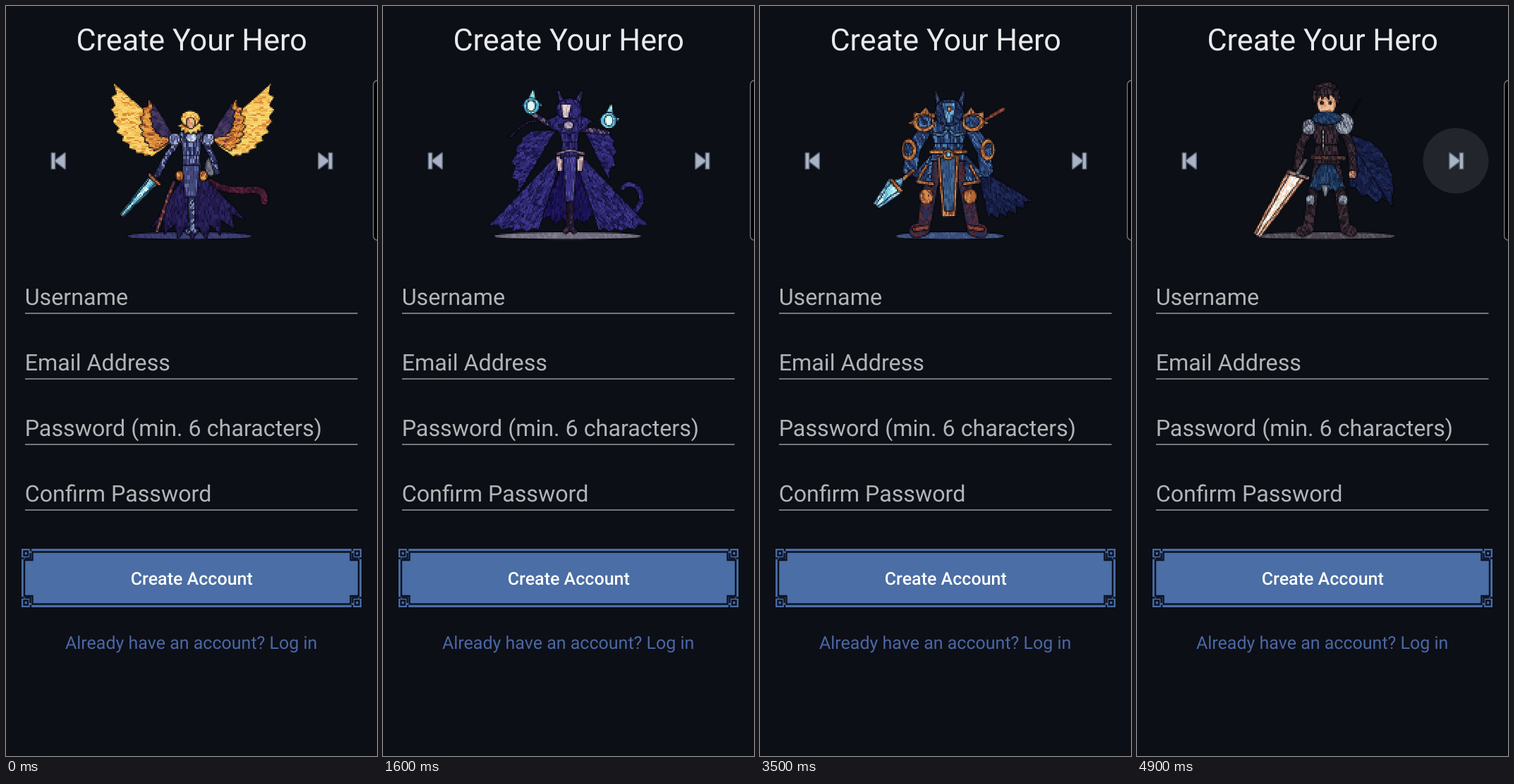
Recreate the animation shown at these times as an HTML page with a canvas. Size 526 by 1064 pixels, loop 5 s.

```html
<!DOCTYPE html>
<html lang="en">
<head>
<meta charset="utf-8">
<title>Create Your Hero</title>
<style>
html, body { margin: 0; width: 100%; height: 100%; overflow: hidden; background: #0c0f16; }
svg, canvas { position: absolute; left: 0; top: 0; }
canvas { left: 140px; top: 96px; width: 246px; height: 246px; image-rendering: pixelated; }
text { font-family: Roboto, sans-serif; text-rendering: geometricPrecision; }
.mid { text-anchor: middle; }
.field { font-size: 32.25px; fill: #b3b4b6; }
.rule { stroke: #97989b; stroke-width: 1.7; }
.icon { fill: #a8b3c6; stroke: #5c6472; stroke-width: 3; stroke-linejoin: round; paint-order: stroke; }
.ink { fill: none; stroke: #0c1222; stroke-width: 2.4; }
</style>
</head>
<body>
<svg width="526" height="1064" viewBox="0 0 526 1064">
  <defs>
    <path id="skip" class="icon" d="M65 209h4v21.500h-4zM83.500 209v21.500L69.500 219.700z"/>
    <g id="corner">
      <path d="M22 770h14v14h-14z" fill="#4a6ca5"/>
      <path class="ink" d="M25.500 773.500h5.500v6h-5.500zM35 770v3.500M22 783.500h3.500M34.500 776v7.500h-8"/>
    </g>
  </defs>
  <rect x="520.700" y="105.700" width="40" height="226.600" rx="6" fill="#000" stroke="#75777a" stroke-width="1.400"/>
  <text class="mid" x="263.200" y="63" font-size="43.200" fill="#e9eaec">Create Your Hero</text>
  <circle id="ripple" cx="452" cy="219.500" r="46.500" fill="#fff" opacity="0"/>
  <use href="#skip"/>
  <use href="#skip" transform="matrix(-1 0 0 1 527 0)"/>
  <g id="fields"></g>
  <rect x="22" y="770" width="482" height="83" fill="#4a6ea5"/>
  <path class="ink" d="M37.500 774.500H488.500V786H500V837H488.500V848.500H37.500V837H26V786H37.500z"/>
  <use href="#corner"/>
  <use href="#corner" transform="matrix(-1 0 0 1 526 0)"/>
  <use href="#corner" transform="matrix(1 0 0 -1 0 1623)"/>
  <use href="#corner" transform="matrix(-1 0 0 -1 526 1623)"/>
  <text class="mid" x="263.300" y="821" font-size="25" font-weight="500" fill="#fff">Create Account</text>
  <text class="mid" x="262.700" y="912" font-size="25" fill="#4c67a5">Already have an account? Log in</text>
</svg>
<canvas id="hero" width="128" height="128"></canvas>
<script>
const LOOP = 5000, STEP = 100, SCALE = 128 / 246;
const ctx = hero.getContext('2d');
ctx.imageSmoothingEnabled = false;
ctx.lineJoin = ctx.lineCap = 'round';

fields.innerHTML = ['Username', 'Email Address', 'Password (min. 6 characters)', 'Confirm Password']
  .map((s, i) => `<text class="field" x="26.700" y="${424 + 93 * i}">${s}</text>
    <path class="rule" d="M27 ${436 + 93 * i}H498.500"/>`).join('');

const GOLD = 'f6cb60 f8d97c edb04c d98b38', EMBER = 'd98a3c b8632f e9a648 7d4034';
const STEEL = '343a68 535f92 23264c 8791bd', NIGHT = '211a4a 2b2460 17113a';
const VIOLET = '2d2871 221d58 3b3687 191443', SKIN = 'efbb94 d49570';
const LEATHER = '451824 61242d 2c111d', RED = '9d1b38 bd2946 701331';
const BRONZE = 'b06837 d48b4e 74402f', PLATE = '263b69 37598c 192646 507fae';
const IRON = '707786 a2a9b7 464b5b', DARK = '2b2028 43313a 1b151f';
const DENIM = '1c3558 2b4b75 142643', ICE = '8edfe9 4ba3c5 d9fbff 6cc4d8';
const CAPE = '161d45 1e2a58 0f142f', SCARF = '3f1930 5c2239 2a1226';

const clamp = v => Math.max(0, Math.min(1, v));
const mix = (a, b, u) => a + (b - a) * u;
const home = new DOMMatrix([SCALE, 0, 0, SCALE, -140 * SCALE, -96 * SCALE]);
let base = home;
const grains = {};

// Seeded tile of shades; the first shades are the most common.
function grain(shades) {
  if (grains[shades]) return grains[shades];
  const list = shades.split(' '), tile = document.createElement('canvas');
  tile.width = tile.height = 64;
  const g = tile.getContext('2d');
  let seed = 7;
  for (let i = 0; i < 4096; i++) {
    seed = (seed * 48271) % 2147483647;
    g.fillStyle = '#' + list[Math.floor((seed / 2147483647) ** 1.4 * list.length)];
    g.fillRect(i % 64, i >> 6, 1, 1);
  }
  return grains[shades] = ctx.createPattern(tile, 'repeat');
}

// Fills a path, or strokes it when a width is given, over a dark outline.
function paint(d, shades, angle = 60, width = 0) {
  const path = new Path2D(), fill = grain(shades);
  path.addPath(new Path2D(d), base);
  fill.setTransform(new DOMMatrix().rotate(base.a < 0 ? -angle : angle).scale(3, 1));
  ctx.strokeStyle = '#07070d';
  ctx.lineWidth = width * SCALE + 1.4;
  ctx.stroke(path);
  ctx.strokeStyle = ctx.fillStyle = fill;
  ctx.lineWidth = width * SCALE;
  if (width) ctx.stroke(path); else ctx.fill(path);
}
const line = (points, width, shades) => paint('M' + points, shades, 60, width);
const blob = (x, y, rx, ry, shades) => paint(`M${x - rx} ${y}a${rx} ${ry} 0 1 0 ${2 * rx} 0a${rx} ${ry} 0 1 0 ${-2 * rx} 0`, shades);

// Straight part that tapers from width w1 to w2.
function limb(x1, y1, x2, y2, w1, w2, shades) {
  const a = Math.atan2(y2 - y1, x2 - x1), c = Math.cos(a) / 2, s = Math.sin(a) / 2;
  paint(`M${x1 - s * w1} ${y1 + c * w1}L${x1 + s * w1} ${y1 - c * w1} ${x2 + s * w2} ${y2 - c * w2} ${x2 - s * w2} ${y2 + c * w2}z`,
    shades, a * 180 / Math.PI);
}

// Ragged sector with n tips: feathers, cloth and hair.
function fan(x, y, [from, to], [near, far], n, shades, notch = .9) {
  let d = `M${x} ${y}L`;
  for (let i = 0; i <= 2 * n; i++) {
    const u = i / (2 * n), a = mix(from, to, u) * Math.PI / 180;
    const r = mix(near, far, u) * (i % 2 ? notch : 1);
    d += `${x + r * Math.cos(a)} ${y + r * Math.sin(a)} `;
  }
  paint(d + 'z', shades, mix(from, to, .6));
}

function within(matrix, draw) {
  const saved = base;
  base = base.multiply(matrix);
  draw();
  base = saved;
}
const move = (y, draw) => within(new DOMMatrix().translate(0, y), draw);
const turn = (x, y, deg, draw) => within(new DOMMatrix().translate(x, y).rotate(deg).translate(-x, -y), draw);
const widen = (x, s, draw) => within(new DOMMatrix([s, 0, 0, 1, x * (1 - s), 0]), draw);
const pair = (x, draw) => { draw(); widen(x, -1, draw); };

const ground = (x, half, shades) => blob(x, 326, half, 5, shades);

function legs({ x, hip, stance, thick }, shades) {
  const knee = mix(hip, 320, .45);
  pair(x, () => {
    line(`${x - thick * .7} ${hip} ${x - stance * .62} ${knee} ${x - stance * .85} 316 ${x - stance - 4} 319`, thick, shades);
  });
}

function torso({ x, neck, hip, span }, shades) {
  const waist = mix(neck, hip, .65);
  limb(x, neck, x, waist, span * 2, span * 1.25, shades);
  limb(x, waist, x, hip + 6, span * 1.25, span * 1.6, shades);
}

// Elbows bend outward from the line between shoulder and hand.
function arms({ x, neck, span, thick }, hands, shades) {
  hands.forEach(([hx, hy], i) => {
    const side = i ? 1 : -1, sx = x + side * span;
    line(`${sx} ${neck + 10} ${mix(sx, hx, .5) + side * thick * .4} ${mix(neck + 10, hy, .5)} ${hx} ${hy}`, thick, shades);
  });
}

function blade(x1, y1, x2, y2, width, shades, edge) {
  limb(x1, y1, x2, y2, width, width * .4, edge);
  limb(x1, y1, x2, y2, width * .6, 2, shades);
}

function angel(wave) {
  const body = { x: 263, neck: 179, hip: 232, span: 17, stance: 1, thick: 7 };
  ground(260, 88, '3e4076 343567');
  turn(264, 185, -1.9 * wave, () => pair(264.5, () => {
    fan(240, 188, [142, 222], [42, 117], 9, GOLD, .92);
    fan(240, 188, [150, 236], [34, 68], 7, EMBER);
    fan(240, 188, [190, 238], [22, 60], 5, '3c2f5a 4d3b5e 272348');
  }));
  turn(290, 250, 3 * wave, () => line('288 250Q315 264 342 261T366 277', 9, SCARF));
  turn(263, 225, wave, () => {
    fan(263, 224, [46, 122], [109, 106], 7, NIGHT, .83);
    line('238 250 225 285 214 319', 4, '5a2b3d a9573b 323056');
  });
  blob(290, 228, 7, 13, '777985 5b5d70');
  legs(body, STEEL);
  torso(body, STEEL);
  limb(262, 226, 262, 270, 22, 15, '454a7d 363a68 6169a0');
  arms(body, [[214, 240], [299, 236]], STEEL);
  blob(263, 187, 7, 6, 'd7def2 97a5d0');
  pair(263, () => {
    blob(239, 189, 7, 8, '6c76a3 474d7c a9b2d6');
    blob(246, 241, 5, 6, EMBER);
  });
  blade(208, 248, 164, 297, 15, ICE, '4ba3c5 3f6d9c');
  line('203 239 217 252', 4, 'b06439 533050');
  fan(262, 160, [30, 150], [22, 22], 6, GOLD, .8);
  blob(261, 160, 13, 11, GOLD);
  blob(262, 166, 5, 7, SKIN);
}

function flame(x, y) {
  fan(x, y + 8, [195, 345], [14, 16], 3, ICE, .8);
  limb(x, y + 4, x + 3, y - 17, 16, 1, ICE);
  blob(x, y + 5, 11, 11, '59c2e6 94e5f6 3b8fbd');
  blob(x, y + 5, 5, 7, 'd0faff f3f5e4');
}

function sorceress(wave) {
  const body = { x: 265, neck: 165, hip: 210, span: 16, stance: 2, thick: 6 };
  ground(262, 104, '706d80 817e8d');
  turn(335, 297, 3 * wave, () => line('332 297C368 302 374 260 353 253Q343 249 338 258', 6, VIOLET));
  fan(265, 200, [68, 112], [112, 112], 4, '191252 120c3c 211860');
  pair(263, () => fan(258, 200, [108, 134], [124, 155], 4, VIOLET, .96));
  line('245 166Q200 154 182 186', 2, '151231 29234c');
  turn(242, 180, wave, () => fan(244, 177, [120, 178], [104, 34], 5, VIOLET));
  turn(284, 176, -wave, () => fan(284, 174, [64, 8], [80, 36], 4, VIOLET));
  legs(body, '2d2034 49304a 1d1731');
  pair(265, () => limb(250, 214, 251, 234, 9, 6, 'd8bfc4 b0909f'));
  arms(body, [[214, 153], [318, 179]], '302353 77647d 231d4c');
  torso(body, VIOLET);
  limb(265, 214, 265, 276, 17, 10, '393384 2c276d 58519a');
  line('248 210 266 204 284 210', 3, '9c829b 6c587f');
  pair(265, () => limb(255, 138, 248, 121, 8, 3, '272250 473d73'));
  fan(264, 145, [30, 150], [38, 38], 6, VIOLET);
  blob(264, 146, 18, 15, VIOLET);
  limb(260, 140, 259, 158, 13, 6, 'e5d2d3 c5a9b7');
  blob(263, 169, 6, 5, 'cfb9c5 9e88a7');
  move(2 * wave, () => flame(210, 135));
  move(-2 * wave, () => flame(320, 159));
}

function redKnight(wave) {
  const body = { x: 247, neck: 160, hip: 213, span: 18, stance: 48, thick: 14 };
  ground(246, 74, '616a91 727aa2');
  turn(247, 130, wave, () => {
    fan(246, 126, [104, 138], [50, 80], 4, RED);
    fan(248, 124, [64, 28], [55, 80], 5, RED);
  });
  turn(250, 205, wave, () => {
    fan(249, 200, [108, 138], [66, 106], 4, RED + ' 4d1126');
    fan(251, 200, [72, 50], [68, 104], 4, '7c1830 4e1328 972338 351124');
  });
  legs(body, LEATHER);
  pair(246, () => blob(228, 236, 6, 8, 'e0a67f bd7b5e'));
  torso(body, LEATHER);
  limb(245, 215, 243, 280, 19, 15, 'a31c33 841730 bd2c40');
  arms({ ...body, thick: 9 }, [[188, 205], [294, 229]], LEATHER + ' 834239');
  blob(245, 165, 14, 8, 'e7b088 c9855f');
  pair(243, () => blob(234, 174, 7, 6, '858fbd bac2df 5b6394'));
  blob(269, 161, 10, 10, '6a3837 a87746 3d202d');
  line('266 167 281 167', 2, 'cf9b61 804d3c');
  line('235 208 273 213', 3, 'a46e4c 5a2b30');
  blob(246, 131, 14, 17, RED);
  limb(247, 128, 247, 150, 15, 8, SKIN);
  line('241 138 253 138', 1.5, '4d252e d49570');
  blade(299, 231, 353, 274, 11, 'e7eaef ffffff', 'a4a9b8 d0d4dd');
  line('294 238 303 223', 3, '8c574b 4c2732');
}

function warlord(wave, open) {
  const body = { x: 267, neck: 163, hip: 213, span: 31, stance: 42, thick: 18 };
  ground(269, 77, '3c4e7d 47618e');
  if (open) widen(266, mix(.35, 1, open), () => pair(263, () => fan(222, 187, [95, 181], [48, 120], 3, CAPE, .8)));
  if (open < 1) widen(312, 1 - open, () => turn(312, 235, wave, () => fan(308, 230, [31, 78], [92, 72], 5, CAPE)));
  line('320 161 345 146', 4, '71362f 9e4d38');
  legs(body, '2b2f52 5a2c32 391d2d');
  pair(267, () => {
    blob(236, 270, 9, 10, BRONZE);
    line('219 317 238 314', 5, '8b4537 542930');
    fan(244, 211, [92, 134], [46, 42], 3, PLATE);
    line('236 226 223 249 245 252', 3, BRONZE);
  });
  arms(body, [[213, 233], [321, 233]], PLATE);
  torso(body, PLATE);
  pair(267, () => {
    line('246 181 258 184 264 177', 3, '5d91ba 3c6698');
    fan(233, 169, [185, 320], [23, 26], 3, BRONZE, .72);
    blob(232, 166, 15, 12, BRONZE);
    blob(233, 164, 10, 8, PLATE);
    blob(211, 204, 10, 15, BRONZE);
    blob(210, 204, 5, 9, PLATE);
  });
  limb(267, 214, 268, 298, 29, 18, BRONZE);
  limb(267, 216, 268, 290, 21, 11, '345582 27416d 456d99');
  line('243 207 291 207', 5, BRONZE);
  blob(267, 211, 7, 7, BRONZE);
  blob(267, 211, 3, 3, '8edff2 4fa7ce');
  pair(269, () => limb(255, 143, 249, 121, 9, 2, '22304f 3e5174'));
  blob(268, 151, 20, 19, '1d2a50 2b406f 131c38');
  limb(268, 138, 268, 166, 19, 6, '477aa9 75b2d4 2e5486');
  blob(268, 146, 2, 3, 'e6944f');
  within(new DOMMatrix().translate(-6 * open, 0), () => {
    if (open > .5) fan(222, 246, [100, 175], [40, 46], 4, CAPE);
    line('192 255 217 234', 4, BRONZE);
    fan(202, 244, [100, 165], [20, 24], 3, '6aa5ce a9deee 3d71a6');
    blade(194, 253, 165, 283, 26, ICE, '6aa5ce a9deee 3d71a6');
    line('187 247 199 262', 4, BRONZE);
  });
}

function swordsman(wave) {
  const body = { x: 269, neck: 160, hip: 218, span: 23, stance: 31, thick: 14 };
  ground(267, 99, '4b4652 625c66');
  turn(302, 185, wave, () => {
    fan(298, 182, [86, 56], [76, 120], 3, CAPE);
    fan(298, 182, [58, 18], [120, 36], 5, CAPE, .97);
  });
  line('316 134 302 157', 1.5, '08080c 19161d');
  legs(body, DARK);
  pair(269, () => blob(246, 275, 6, 7, IRON));
  fan(269, 208, [62, 118], [57, 57], 4, DENIM);
  limb(267, 254, 267, 270, 11, 2, IRON);
  arms({ ...body, thick: 11 }, [[227, 227], [307, 236]], DARK);
  blob(306, 239, 5, 5, 'cf9675 8f5b4c');
  torso(body, DARK);
  line('264 176 264 203', 2, '95909a 544149');
  line('248 215 293 216', 5, '5a4038 30222a');
  blob(294, 167, 13, 15, IRON);
  blob(244, 172, 9, 11, IRON);
  fan(268, 128, [150, 390], [21, 21], 9, DARK, .85);
  blob(269, 139, 13, 15, SKIN);
  pair(268, () => blob(262, 138, 1.5, 1.5, '2b1c25'));
  fan(267, 115, [15, 165], [17, 17], 5, DARK, .6);
  blob(269, 159, 21, 9, DENIM);
  blade(226, 239, 170, 325, 26, 'f3e2d1 ffffff f0c8a8', 'a66b53 d89c78 e9c2a2');
  line('214 236 242 244', 4, 'a08078 5a4a50');
  line('228 238 239 219', 4, '5e5962 8c8a92');
}

// Each hero enters at its time, by a tap on the next button.
const cast = [
  { from: 0, draw: angel },
  { from: 1300, draw: sorceress },
  { from: 2200, draw: redKnight },
  { from: 3100, draw: warlord },
  { from: 4700, draw: swordsman }
];

function render(t) {
  ctx.clearRect(0, 0, 128, 128);
  cast.findLast(c => t >= c.from).draw(Math.sin(t * Math.PI / 600), clamp((t - 3700) / 500));
  const glow = cast.slice(1).map(({ from }) => Math.min(clamp((t - from + 150) / 100), clamp((from + 300 - t) / 90)));
  ripple.setAttribute('opacity', .09 * Math.max(...glow));
}

const start = performance.now();
let shown = -1;
function tick() {
  const t = (performance.now() - start) % LOOP;
  const pose = Math.floor(t / STEP) * STEP;
  if (pose !== shown) render(shown = pose);
  requestAnimationFrame(tick);
}
tick();
</script>
</body>
</html>
```
